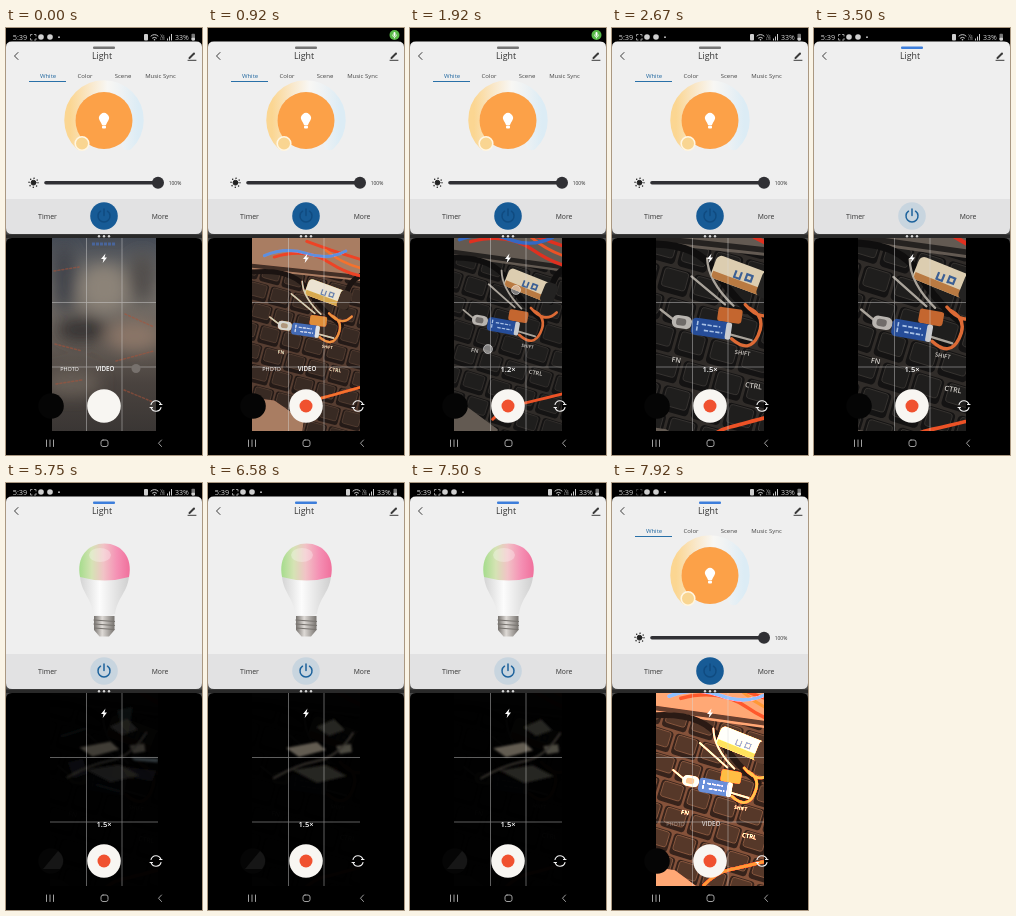
Animation of 196x427 px, one loop 8 s. Source, as an HTML page:

```html
<!DOCTYPE html>
<html lang="en">
<head>
<meta charset="utf-8">
<title>Smart light and camera</title>
<style>
html, body { margin: 0; width: 100%; height: 100%; overflow: hidden; background: #000; }
svg { display: block; width: 100%; height: 100%; }
text { font-family: "Open Sans", sans-serif; text-anchor: middle; }
.line { fill: none; stroke-linecap: round; stroke-linejoin: round; }
#warm { mix-blend-mode: color-dodge; }
</style>
</head>
<body>
<svg viewBox="0 0 196 427" preserveAspectRatio="none">
  <defs>
    <linearGradient id="ring">
      <stop offset="0" stop-color="#fbd692"/><stop offset=".3" stop-color="#f9e8cb"/>
      <stop offset=".55" stop-color="#f8f7f4"/><stop offset=".75" stop-color="#eef2f4"/>
      <stop offset="1" stop-color="#dcecf5"/>
    </linearGradient>
    <linearGradient id="dome">
      <stop offset="0" stop-color="#a5dc8c"/><stop offset=".25" stop-color="#d5e3b4"/>
      <stop offset=".48" stop-color="#f1c3c6"/><stop offset=".75" stop-color="#f590b4"/>
      <stop offset="1" stop-color="#f0709c"/>
    </linearGradient>
    <linearGradient id="body">
      <stop offset="0" stop-color="#d4d4d4"/><stop offset=".4" stop-color="#fcfcfc"/>
      <stop offset="1" stop-color="#cfcfcf"/>
    </linearGradient>
    <linearGradient id="screw">
      <stop offset="0" stop-color="#77736f"/><stop offset=".4" stop-color="#dedad6"/>
      <stop offset="1" stop-color="#77736f"/>
    </linearGradient>
    <linearGradient id="haze" x2="0" y2="1">
      <stop offset="0" stop-color="#454b55"/><stop offset=".25" stop-color="#77736e"/>
      <stop offset=".5" stop-color="#69615a"/><stop offset=".75" stop-color="#4a433f"/>
      <stop offset="1" stop-color="#3a3634"/>
    </linearGradient>
    <filter id="soft" x="-50%" y="-50%" width="200%" height="200%"><feGaussianBlur stdDeviation="8"/></filter>
    <filter id="dim"><feGaussianBlur stdDeviation=".8"/></filter>
    <clipPath id="view"><rect id="viewRect" x="44" y="210" width="108" height="193"/></clipPath>
  </defs>

  <rect width="196" height="427"/>

  <!-- Status bar -->
  <g id="status" fill="#cfcfcf">
    <text x="14" y="11.600" font-size="7.400">5:39</text>
    <path id="scan" class="line" stroke="#bbb" stroke-width=".8" d="M24.5 8V6.5H26M28.5 6.500H30V8M30 10.500V12H28.500M26 12H24.500V10.500"/>
    <circle cx="35" cy="9" r="2.800"/><circle cx="44" cy="9" r="2.800"/><circle cx="53" cy="9.200" r=".9"/>
    <rect x="138" y="6" width="4" height="6.500" rx="1"/>
    <path class="line" stroke="#ccc" d="M145 8Q148.500 5 152 8M146.500 10Q148.500 8.500 150.500 10"/>
    <circle cx="148.500" cy="11.700" r=".8"/>
    <text x="156.500" y="8.700" font-size="3.200">Vo</text><text x="156.500" y="12.200" font-size="3.200">LTE</text>
    <path d="M161 12.500V10.500H162V12.500ZM163 12.500V8.500H164V12.500ZM165 12.500V6H166V12.500Z"/>
    <text x="176" y="11.600" font-size="7">33%</text>
    <rect x="185.500" y="5.800" width="3.500" height="6.600" rx=".8" fill="#777"/><rect x="185.500" y="9.800" width="3.500" height="2.600" rx=".8"/>
  </g>
  <g id="mic">
    <circle r="5" fill="#58b947"/>
    <rect x="-1" y="-3" width="2" height="4" rx="1" fill="#fff"/>
    <path class="line" stroke="#fff" stroke-width=".7" d="M-2 0Q-2 2 0 2T2 0M0 2V3"/>
  </g>

  <!-- Light app -->
  <rect y="196" width="196" height="20" fill="#4a4a4a"/>
  <path d="M0 171V19Q0 13.500 6 13.500H190Q196 13.500 196 19V171Z" fill="#efefef"/>
  <path d="M0 171H196V200Q196 206 190 206H6Q0 206 0 200Z" fill="#e2e2e3"/>
  <rect id="handle" x="87" y="18.500" width="22" height="2.600" rx="1"/>
  <g class="line" stroke="#3a3a3a">
    <path d="M12 24.500L8.500 28L12 31.500"/>
    <path d="M182 32.300H190"/><path d="M183.500 30L188 25.500" stroke-width="2"/>
  </g>
  <g fill="#333">
    <text x="96" y="31.200" font-size="8.800">Light</text>
    <text x="41.500" y="191.200" font-size="7">Timer</text><text x="154" y="191.200" font-size="6.800">More</text>
  </g>
  <g id="on">
    <g font-size="6" fill="#444">
      <text x="42" y="50" fill="#2268a0">White</text><text x="79" y="50">Color</text>
      <text x="117" y="50">Scene</text><text x="154.500" y="50">Music Sync</text>
    </g>
    <path d="M23 53.500H60" stroke="#2970a8"/>
    <path class="line" d="M74.500 116.500A34 34 0 1 1 121.500 116.500" stroke="url(#ring)" stroke-width="11.500"/>
    <circle cx="98" cy="92.500" r="28.500" fill="#fca148"/>
    <path d="M96 97Q95 94.500 93.700 92.500A5 5 0 1 1 102.300 92.500Q101 94.500 100 97Z" fill="#fff"/>
    <rect x="96" y="97.600" width="4" height="3" rx="1" fill="#fff"/>
    <circle cx="76" cy="115.500" r="6.800" fill="#f9d591" stroke="#fff6e2" stroke-width="1.600"/>
    <path class="line" d="M40 154.700H152" stroke="#303034" stroke-width="3.600"/>
    <circle cx="152" cy="154.700" r="6" fill="#303034"/>
    <g transform="translate(27.500 154.700)" class="line" stroke="#222" stroke-width="1">
      <circle r="2.400" fill="#222"/><circle r="4.500" stroke-width="1.400" stroke-dasharray=".1 3.434"/>
    </g>
    <text x="169" y="156.600" font-size="5" fill="#333">100%</text>
  </g>
  <g id="bulb">
    <path d="M74 91C74 108 85 114 87.500 131Q98 135 109 131C111.500 114 123 108 123 91Z" fill="url(#body)"/>
    <path d="M74 94C70 74 82 60.500 98.500 60.500S127 74 123 94Q98.500 101 74 94Z" fill="url(#dome)"/>
    <ellipse cx="94" cy="72" rx="11" ry="7" fill="#fff" opacity=".3"/>
    <path d="M88 133H108.500V147L103 153.500H93.500L88 147Z" fill="url(#screw)"/>
    <path d="M87.500 137L109 138.500M87.500 141L109 142.500M88 145L108.500 146.500" stroke="#77736f" stroke-width="1.200"/>
  </g>
  <circle id="power" cx="98" cy="188" r="13.800"/>
  <path id="powerIcon" class="line" stroke-width="1.500" d="M94.500 183.200A6 6 0 1 0 101.500 183.200M98 181V187.500"/>

  <!-- Camera app -->
  <path d="M0 427V216Q0 210 6 210H190Q196 210 196 216V427Z"/>
  <path d="M0 206.500H196V210H0Z" fill="#292929"/>
  <g fill="#d5d5d5"><circle cx="93" cy="208.300" r="1.200"/><circle cx="98" cy="208.300" r="1.200"/><circle cx="103" cy="208.300" r="1.200"/></g>
  <g clip-path="url(#view)" style="isolation:isolate">
    <g id="scene">
      <rect x="-200" y="-200" width="400" height="400" fill="#302c29"/>
      <g id="keys" transform="rotate(7)"></g>
      <path d="M-120 -110H120V-58L40 -56L-120 -50ZM-120 76L-20 74L12 90V130H-120Z" fill="#635a52"/>
      <path d="M-120 -54L40 -60L120 -62" stroke="#252220" stroke-width="4"/>
      <g fill="#d2cec8" font-size="5" font-weight="600">
        <text x="-20" y="27">FN</text><text x="25" y="15" font-size="4">SHIFT</text><text x="36" y="37">CTRL</text>
      </g>
      <g class="line">
        <path stroke="#0f0e0e" stroke-width="5" d="M-60 -50Q-20 -60 -2 -40T36 -10M52 -64Q32 -54 38 -28"/>
        <path stroke="#e0301f" stroke-width="3" d="M-40 -68Q-10 -82 16 -70T70 -62M-10 -88Q24 -80 60 -76"/>
        <path stroke="#ec5226" stroke-width="2.600" d="M10 -82Q36 -66 70 -69M6 82Q14 70 24 66T70 46"/>
        <path stroke="#3468c4" stroke-width="3" d="M-50 -68Q-30 -80 -8 -76T30 -84"/>
        <path stroke="#dd6a35" stroke-width="2.300" d="M16 5Q30 14 34 0T25 -18M22 -20Q36 -8 45 -20"/>
        <path stroke="#aaa49b" stroke-width="1.600" d="M-18 -34L8 -18M-9 -48Q-6 -32 14 -18M-36 -8L-22 0M13 2L30 4"/>
      </g>
      <g transform="translate(16 -40) rotate(12)">
        <rect x="-20" y="-8" width="40" height="17" rx="4" fill="#dccdb0"/>
        <path d="M-19 4H20V6Q20 9 16 9H-16Q-20 9 -19 4Z" fill="#b97a42"/>
        <path d="M-4 -2V3H0V-2M4 3V-2H8V2H4" fill="none" stroke="#3b5f94" stroke-width="1.500"/>
        <rect x="14" y="-9" width="12" height="19" rx="4" fill="#242322"/>
      </g>
      <rect x="4" y="-16" width="17" height="10" rx="2" fill="#c4662f"/>
      <rect x="-27" y="-6" width="14" height="9" rx="4" fill="#b9b5b0"/>
      <rect x="-24" y="-4" width="7" height="5" rx="2" fill="#706c69"/>
      <rect x="-13" y="-6" width="27" height="12" rx="3" fill="#264d99"/>
      <path d="M-9 -4V4M-6 -2H7M-4 2H9" stroke="#a9c2e6" stroke-width="1.100" stroke-dasharray="3 1"/>
      <rect x="11" y="-6" width="4" height="12" rx="1.500" fill="#c9cbd0"/>
    </g>
    <rect id="warm" x="44" y="210" width="108" height="193" fill="#a3764c"/>
    <rect id="dark" x="44" y="210" width="108" height="193"/>
    <g id="night" filter="url(#dim)">
      <g id="nightA">
        <path d="M118 275L146 276L145 280L122 278Z" fill="#8ea5b1"/>
        <path d="M104 228L120 224L116 251L109 244Z" fill="#25282b"/>
        <path d="M55 280L70 276L75 291L61 296ZM108 284L144 288L139 299L114 294Z" fill="#1d2226"/>
        <path d="M48 254L73 246M83 302L107 309" stroke="#22282c" stroke-width="2"/>
      </g>
      <g id="nightB">
        <path d="M78 265L109 259L118 267L91 274Z" fill="#625c51"/>
        <path d="M128 263L143 261L144 269L132 271Z" fill="#4b4841"/>
        <path d="M108 244L126 236L137 247L121 253ZM84 287L118 282L139 293L109 300Z" fill="#272522"/>
        <path class="line" d="M66 295Q88 282 109 278T145 250" stroke="#38342f" stroke-width="2"/>
      </g>
    </g>
    <g id="blur">
      <rect x="44" y="210" width="108" height="193" fill="url(#haze)"/>
      <g filter="url(#soft)">
        <ellipse cx="98" cy="260" rx="24" ry="24" fill="#8c8378"/><ellipse cx="136" cy="250" rx="14" ry="25" fill="#514d4b"/>
        <ellipse cx="58" cy="250" rx="12" ry="35" fill="#40434a"/><ellipse cx="75" cy="302" rx="25" ry="12" fill="#343232"/>
        <ellipse cx="128" cy="308" rx="27" ry="15" fill="#8b7668"/><ellipse cx="65" cy="355" rx="30" ry="13" fill="#685e57"/>
      </g>
      <path class="line" d="M48 243L73 239M119 286L148 299M49 316L76 323M110 333L148 323M50 356L76 352M118 362L147 374" stroke="#a95239" stroke-width="1.500" stroke-dasharray="2 2" opacity=".55"/>
      <path d="M86 216H110" stroke="#496fb8" stroke-width="3" stroke-dasharray="3 1" opacity=".7"/>
    </g>
    <path d="M80.500 210V403M116 210V403M44 274.500H152M44 339H152" stroke="#d8d8d8" stroke-width=".8" opacity=".55"/>
  </g>
  <path d="M99.500 225.500L95 231H97.500L96.700 235L101 229.500H98.500Z" fill="#fff"/>
  <g id="modes" fill="#fff">
    <text id="photo" x="63.500" y="343" font-size="5.500">PHOTO</text><text x="99" y="343" font-size="6.200" font-weight="600">VIDEO</text>
  </g>
  <circle id="modeDot" cx="130" cy="340.500" r="4.500" fill="#77716d"/>
  <text id="zoom" x="98" y="343.800" font-size="7.600" font-weight="600" fill="#fff"></text>
  <g id="touch" fill="#fff" fill-opacity=".45" stroke="#fff" stroke-opacity=".5">
    <circle id="fingerA" r="4.500"/><circle id="fingerB" r="4.500"/>
  </g>
  <circle cx="45" cy="378" r="12.800" fill="#050505"/>
  <path id="thumb" d="M37 386L52 368A12 12 0 0 1 54 386Z" fill="#161616"/>
  <circle cx="98" cy="378" r="16.800" fill="#f8f6f2"/>
  <circle id="rec" cx="98" cy="378" r="6.500" fill="#f0512f"/>
  <g class="line" stroke="#f2f2f2" stroke-width="1.100">
    <path d="M145 376.500A5.200 5.200 0 0 1 154.800 376M155 379.500A5.200 5.200 0 0 1 145.200 380M153.500 376.500H156M144 379.500H146.500"/>
  </g>

  <g class="line" stroke="#a0a0a0" stroke-width="1">
    <path d="M40.500 412V418.500M44 412V418.500M47.500 412V418.500M155.500 412L152.500 415.200L155.500 418.500"/>
    <rect x="95" y="412" width="7" height="6.500" rx="2"/>
  </g>
</svg>
<script>
const LOOP = 8000, OFF = 3420, ON = 7660;
const el = {};
document.querySelectorAll("[id]").forEach(node => el[node.id] = node);

let keys = "";
for (let row = -6; row <= 6; row++) {
  for (let col = -5; col <= 5; col++) {
    const x = col * 23 - 10 + (row & 1) * 9, y = row * 20 + 14;
    keys += `<rect x="${x - 10}" y="${y - 8}" width="21" height="18" rx="3" fill="#141313"/>` +
      `<rect x="${x - 8}" y="${y - 7}" width="17" height="13" rx="2" fill="#1f1e1d" stroke="#383532" stroke-width=".6"/>`;
  }
}
el.keys.innerHTML = keys;

// Linear interpolation through rows of [time, ...values].
function track(t, rows) {
  let i = 0;
  while (i < rows.length - 2 && t >= rows[i + 1][0]) i++;
  const a = rows[i], b = rows[i + 1];
  const p = Math.min(1, Math.max(0, (t - a[0]) / (b[0] - a[0])));
  return a.slice(1).map((v, n) => v + (b[n + 1] - v) * p);
}
const ramp = (t, from, to) => Math.min(1, Math.max(0, (t - from) / (to - from)));
const set = (name, attr, value) => el[name].setAttribute(attr, value);
const fade = (name, value) => set(name, "opacity", value);
const move = (name, x, y) => set(name, "transform", `translate(${x} ${y})`);

function drawApp(t) {
  const lit = t < OFF || t >= ON;
  fade("on", +lit);
  fade("bulb", lit ? 0 : ramp(t, 3650, 3900));
  set("handle", "fill", t < 3330 ? "#757575" : "#3d7edb");
  set("power", "fill", lit ? "#175b96" : "#c8d5df");
  set("powerIcon", "stroke", lit ? "#104b80" : "#1c629c");
  fade("status", 1 - ramp(t, 250, 420) + ramp(t, 2250, 2420));
  fade("scan", t % 1000 < 850 ? 1 : .4);
  const mic = ramp(t, 330, 500) - ramp(t, 2170, 2420);
  set("mic", "transform", `translate(186.500 7) scale(${mic})`);
}

function drawCamera(t) {
  const [x, y, zoom, angle] = track(t, [
    [0, 96, 309, .95, 4], [920, 97, 302, 1, 8], [1920, 92, 298, 1.14, 10],
    [2500, 98, 300, 1.43, 8], [3500, 97, 302, 1.45, 10], [7660, 100, 301, 1.3, 8], [7920, 102, 304, 1.2, 10]
  ]);
  const sway = Math.sin(t / 210) * .6;
  set("scene", "transform", `translate(${x + sway} ${y}) rotate(${angle}) scale(${zoom})`);
  const start = ramp(t, 250, 500);
  set("viewRect", "x", 46 - 2 * start);
  set("viewRect", "width", 104 + 4 * start);
  fade("blur", 1 - ramp(t, 250, 670));
  fade("warm", track(t, [[0, .5], [920, .45], [1920, 0], [7660, 0], [7800, 1]])[0]);
  fade("dark", track(t, [[3520, 0], [3750, .98], [7700, .98], [7800, 0]])[0]);

  const night = ramp(t, 3650, 3900) * (1 - ramp(t, 7660, 7750));
  const pan = ramp(t, 4900, 6200);
  fade("night", night);
  fade("nightA", 1 - pan);
  fade("nightB", pan);
  move("nightA", (t - 4670) / 160, Math.sin((t - 4670) / 300));
  move("nightB", (t - 6580) / 180, Math.sin((t - 6580) / 320));
  fade("thumb", night);
}

function drawControls(t) {
  const pinch = ramp(t, 1670, 2450);
  fade("modes", t < ON ? 1 - ramp(t, 1600, 1750) : .75);
  fade("photo", t < ON ? 1 : .6);
  fade("modeDot", 1 - ramp(t, 200, 420));
  fade("zoom", t >= 1670 && t < ON ? 1 : 0);
  el.zoom.textContent = (1 + Math.round(pinch * 5) / 10).toFixed(1) + "×";
  fade("touch", ramp(t, 1580, 1670) * (1 - ramp(t, 2450, 2540)));
  const spread = (t - 1920) / 50;
  move("fingerA", 78 - spread, 321 + spread * 2);
  move("fingerB", 106 + spread, 262 - spread * 2);
  fade("rec", ramp(t, 250, 420));
}

function frame(now) {
  const t = now % LOOP;
  drawApp(t);
  drawCamera(t);
  drawControls(t);
  requestAnimationFrame(frame);
}
requestAnimationFrame(frame);
</script>
</body>
</html>
```
